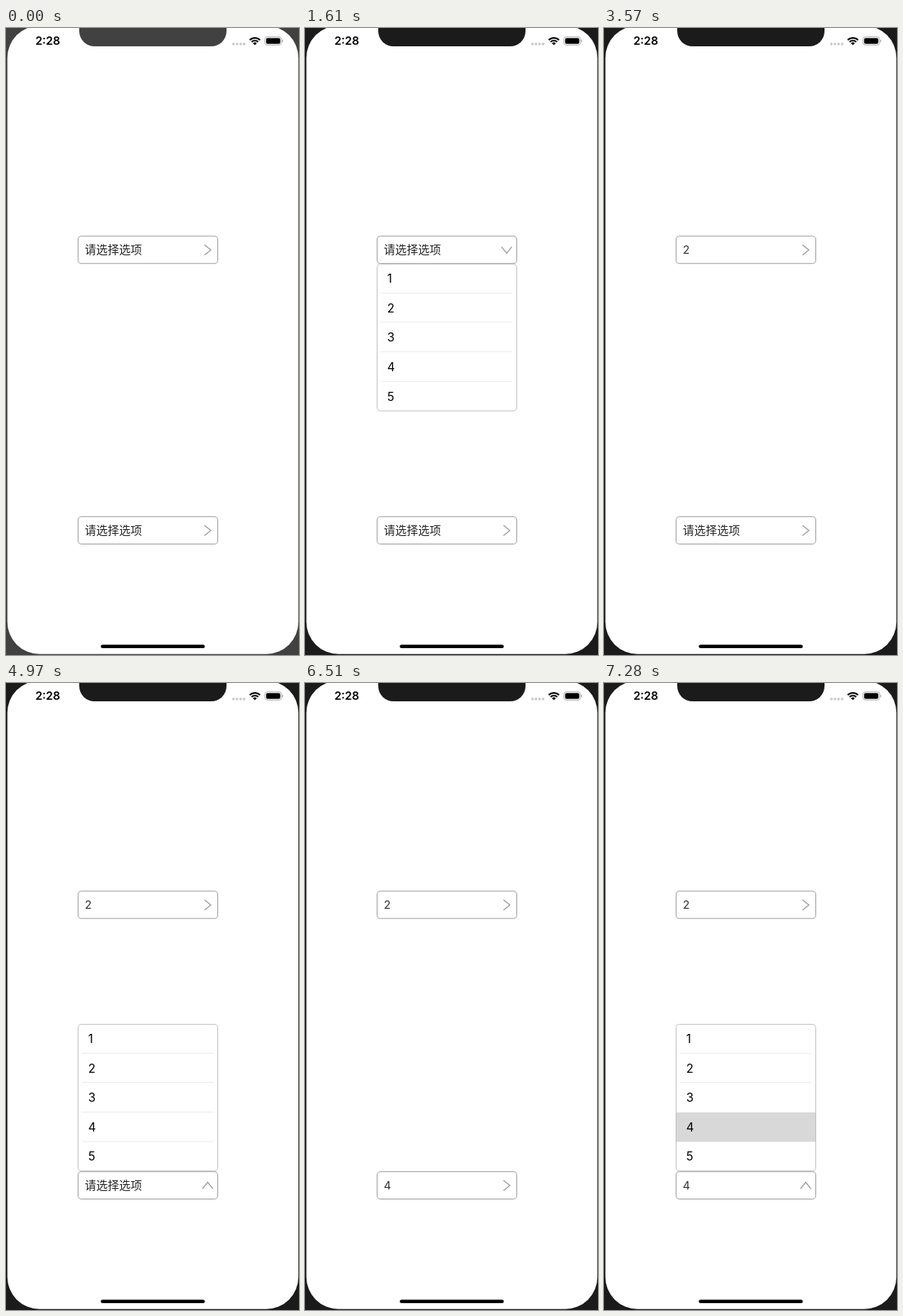
An HTML page with a canvas for the animation above (8 s loop, 384 by 822 pixels).

```html
<!DOCTYPE html>
<html lang="zh">
<head>
<meta charset="utf-8">
<title>Dropdown menus</title>
<style>
html, body { margin: 0; width: 100%; height: 100%; overflow: hidden; background: #fff; }
canvas { display: block; width: 384px; height: 822px; }
</style>
</head>
<body>
<canvas id="stage"></canvas>
<script>
const W = 384, H = 822, LOOP = 8000, TICK = 70, SLIDE = 300;
const PT = 0.92;                       // pixels per layout point
const BOX = { x: 94, w: 200 * PT, h: 40 * PT };
const ROW = 42 * PT, ROWS = 5, FULL = ROW * ROWS;
const SANS = 'Inter, Roboto, sans-serif';
const HAN = '"Noto Sans CJK SC", "Noto Sans CJK", Inter, sans-serif';
const PROMPT = '请选择选项';

const menus = [
  { y: 272.4, dir: 1, pick: 2, pickAt: 3233,
    moves: [{ at: 1275, to: 1 }, { at: 3233, to: 0 }] },
  { y: 640.2, dir: -1, pick: 4, pickAt: 6175,
    moves: [{ at: 4610, to: 1 }, { at: 6175, to: 0 }, { at: 6945, to: 1 }] }
];

const canvas = document.getElementById('stage');
const ctx = canvas.getContext('2d');
const dpr = window.devicePixelRatio || 1;
canvas.width = W * dpr;
canvas.height = H * dpr;

// Cubic ease-in-out with control points (.42, 0) and (.58, 1)
function ease(x) {
  if (x <= 0) return 0;
  if (x >= 1) return 1;
  let lo = 0, hi = 1, s = 0.5;
  for (let i = 0; i < 24; i++) {
    s = (lo + hi) / 2;
    const r = 1 - s;
    const bx = 3 * r * r * s * 0.42 + 3 * r * s * s * 0.58 + s * s * s;
    if (bx < x) lo = s; else hi = s;
  }
  return s * s * (3 - 2 * s);
}

function openness(menu, t) {
  let v = 0;
  for (const m of menu.moves) v += (m.to - v) * ease((t - m.at) / SLIDE);
  return v;
}

function roundPath(x, y, w, h, r) {
  ctx.beginPath();
  ctx.roundRect(x, y, w, h, r);
}

function fillRound(x, y, w, h, r, color) {
  roundPath(x, y, w, h, r);
  ctx.fillStyle = color;
  ctx.fill();
}

function frameBox(x, y, w, h, color) {
  const i = PT / 2;
  roundPath(x + i, y + i, w - PT, Math.max(0, h - PT), Math.min(4.2, h / 2));
  ctx.strokeStyle = color;
  ctx.lineWidth = PT;
  ctx.stroke();
}

function text(str, x, y, font, color, align = 'left') {
  ctx.font = font;
  ctx.fillStyle = color;
  ctx.textAlign = align;
  ctx.fillText(str, x, y);
}

function drawChevron(cx, cy, angle) {
  ctx.save();
  ctx.translate(cx, cy);
  ctx.rotate(angle);
  ctx.beginPath();
  ctx.moveTo(-4.2, -6.8);
  ctx.lineTo(4.2, 0);
  ctx.lineTo(-4.2, 6.8);
  ctx.strokeStyle = '#999';
  ctx.lineWidth = 1.25;
  ctx.stroke();
  ctx.restore();
}

function drawList(menu, open, picked) {
  const h = FULL * open;
  if (h < 0.5) return;
  const { x, w } = BOX;
  const top = menu.dir > 0 ? menu.y + BOX.h : menu.y - h;
  ctx.save();
  roundPath(x, top, w, h, Math.min(4.6, h / 2));
  ctx.clip();
  ctx.fillStyle = '#fff';
  ctx.fillRect(x, top, w, h);
  for (let n = 1; n <= ROWS; n++) {
    const y = top + (n - 1) * ROW;
    const on = picked && n === menu.pick;
    if (on) {
      ctx.fillStyle = '#d8d8d8';
      ctx.fillRect(x, y, w, ROW);
    } else if (n < ROWS && !(picked && n + 1 === menu.pick)) {
      ctx.fillStyle = '#ebebeb';
      ctx.fillRect(x + 5, Math.round(y + ROW - 1), w - 11, 1);
    }
    text(String(n), x + 13.8, y + ROW / 2 + 5.6, '15.6px ' + SANS, '#000');
  }
  ctx.restore();
  frameBox(x, top, w, h, '#bbb');
}

function drawMenu(menu, t) {
  const open = openness(menu, t);
  const picked = t >= menu.pickAt;
  const mid = menu.y + BOX.h / 2;
  frameBox(BOX.x, menu.y, BOX.w, BOX.h, '#949494');
  if (picked) text(String(menu.pick), 103.2, mid + 5.4, '14.8px ' + SANS, '#333');
  else text(PROMPT, 103.3, mid + 5.6, '15px ' + HAN, '#222');
  drawChevron(264.3, mid + 0.2, menu.dir * open * Math.PI / 2);
  drawList(menu, open, picked);
}

function drawWifi(cx, cy) {
  const a = Math.PI * 0.25;
  ctx.strokeStyle = '#000';
  ctx.lineWidth = 2.1;
  for (const r of [9.6, 6.1]) {
    ctx.beginPath();
    ctx.arc(cx, cy, r, -Math.PI / 2 - a, -Math.PI / 2 + a);
    ctx.stroke();
  }
  ctx.beginPath();
  ctx.moveTo(cx, cy);
  ctx.arc(cx, cy, 3.6, -Math.PI / 2 - a, -Math.PI / 2 + a);
  ctx.closePath();
  ctx.fillStyle = '#000';
  ctx.fill();
}

function drawStatus() {
  text('2:28', 54.7, 22.4, '600 14.8px ' + SANS, '#000', 'center');
  ctx.fillStyle = '#c8c8c8';
  for (let i = 0; i < 4; i++) {
    ctx.beginPath();
    ctx.arc(298.1 + i * 4.65, 20.9, 1.75, 0, Math.PI * 2);
    ctx.fill();
  }
  drawWifi(326.2, 22.6);
  roundPath(339.4, 11.7, 21.5, 10.6, 3);
  ctx.strokeStyle = '#a6a6a6';
  ctx.lineWidth = 0.95;
  ctx.stroke();
  fillRound(340.9, 13.2, 18.5, 7.6, 1.7, '#000');
  fillRound(361.9, 15.2, 1.2, 3.6, [0, 1.2, 1.2, 0], '#a6a6a6');
}

function draw(t) {
  const shell = t < 1190 ? '#414142' : '#1b1b1c';
  ctx.setTransform(dpr, 0, 0, dpr, 0, 0);
  ctx.fillStyle = shell;
  ctx.fillRect(0, 0, W, H);
  fillRound(1.8, -3, 381.4, 823.8, 42, '#fff');
  fillRound(96, -10, 193, 34, [0, 0, 20, 20], shell);
  drawStatus();
  for (const menu of menus) drawMenu(menu, t);
  fillRound(124.2, 808.4, 136.4, 4.7, 2.35, '#000');
}

const start = performance.now();
function loop() {
  const t = (performance.now() - start) % LOOP;
  draw(Math.floor(t / TICK) * TICK);
  requestAnimationFrame(loop);
}
loop();
</script>
</body>
</html>
```
